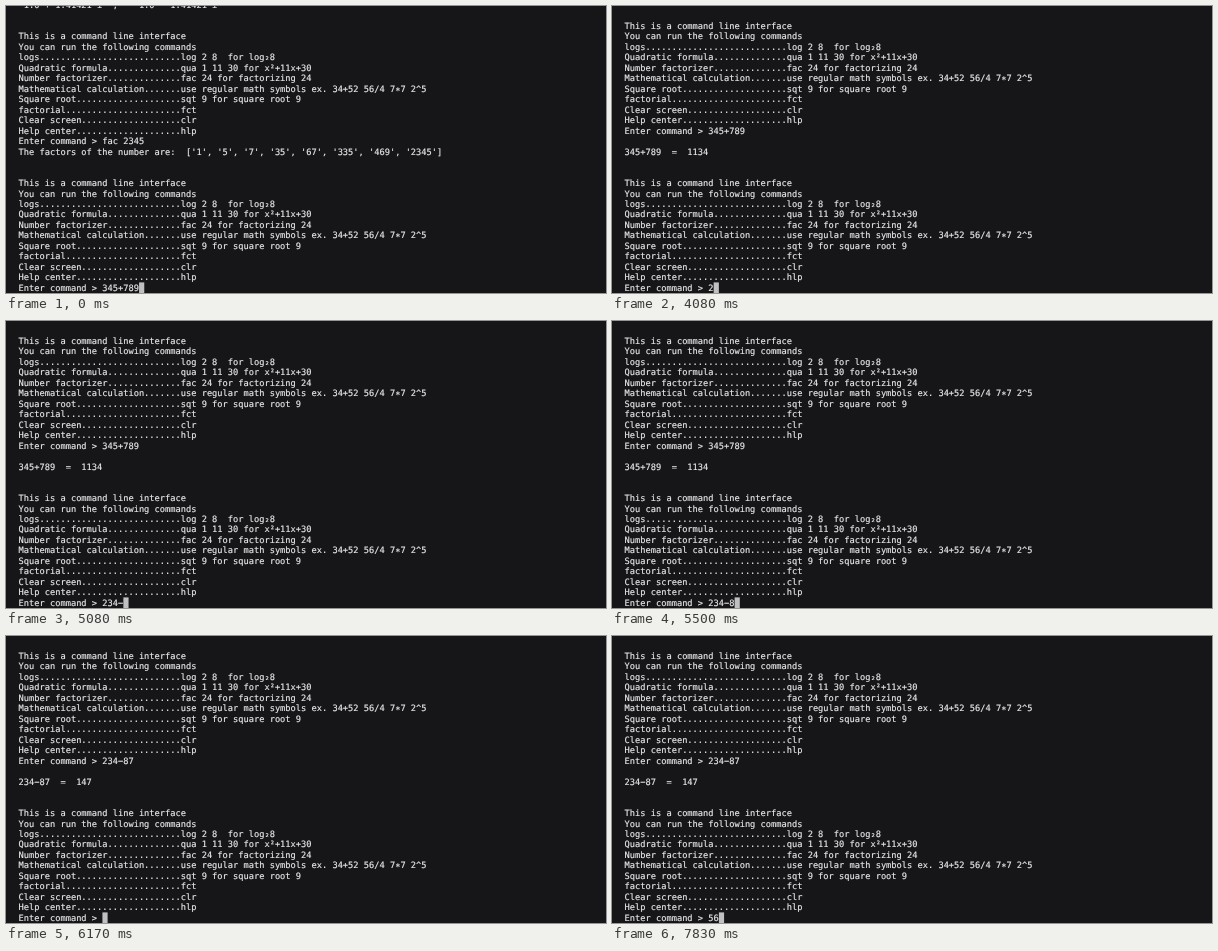
Recreate the animation shown at these times as an HTML page. Size 600 by 287 pixels, loop 8 s.

```html
<!DOCTYPE html>
<html lang="en">
<head>
<meta charset="utf-8">
<title>Command line calculator</title>
<style>
  html, body { margin: 0; width: 100%; height: 100%; overflow: hidden; background: #161517; }
  svg { display: block; width: 600px; height: 287px; }
  text {
    font: 8.7px "DejaVu Sans Mono", monospace;
    fill: #e9e9ea;
    stroke: #e9e9ea;
    stroke-width: 0.18px;
    white-space: pre;
    text-rendering: geometricPrecision;
  }
</style>
</head>
<body>
<svg viewBox="0 0 600 287">
  <rect width="600" height="287" fill="#161517"/>
  <rect id="cursor" y="276.4" width="5.2" height="10.6" fill="#c0c0c1"/>
  <g id="screen"></g>
</svg>
<script>
const LOOP = 8000, LEFT = 12.6, CHAR = 5.238, BASE = 23, LINE = 10.47;
const PROMPT = "Enter command > ";
const FIRST_ROW = -2, LAST_ROW = 25;

const entry = (name, usage) => name.padEnd(31, ".") + usage;
const MENU = [
  "This is a command line interface",
  "You can run the following commands",
  entry("logs", "log 2 8  for log₂8"),
  entry("Quadratic formula", "qua 1 11 30 for x²+11x+30"),
  entry("Number factorizer", "fac 24 for factorizing 24"),
  entry("Mathematical calculation", "use regular math symbols ex. 34+52 56/4 7∗7 2^5"),
  entry("Square root", "sqt 9 for square root 9"),
  entry("factorial", "fct"),
  entry("Clear screen", "clr"),
  entry("Help center", "hlp")
];

const session = (command, ...output) => [...MENU, PROMPT + command, ...output, "", ""];
const FACTORED = ["'1.0 + 1.41421 i' ,   '1.0 − 1.41421 i'", "", "",
  ...session("fac 2345", "The factors of the number are:  " +
    "['1', '5', '7', '35', '67', '335', '469', '2345']")];
const ADDED = ["", "", ...session("345+789", "", "345+789  =  1134")];
const SUBTRACTED = ["", "", ...session("234−87", "", "234−87  =  147")];

// start time, scrollback, typed text
const STEPS = [
  [0, FACTORED, "345+789"],
  [250, ADDED, ""],
  [4080, ADDED, "2"],
  [4330, ADDED, "23"],
  [4580, ADDED, "234"],
  [5080, ADDED, "234−"],
  [5500, ADDED, "234−8"],
  [5750, ADDED, "234−87"],
  [6170, SUBTRACTED, ""],
  [7670, SUBTRACTED, "5"],
  [7830, SUBTRACTED, "56"]
];

const screen = document.getElementById("screen");
const cursor = document.getElementById("cursor");
const rows = [];
for (let i = FIRST_ROW; i <= LAST_ROW; i++) {
  const row = document.createElementNS("http://www.w3.org/2000/svg", "text");
  row.setAttribute("x", LEFT);
  row.setAttribute("y", BASE + i * LINE);
  screen.append(row);
  rows.push(row);
}

let shown = null;
function draw(time) {
  const step = STEPS.findLast(([start]) => start <= time);
  if (step === shown) return;
  shown = step;
  const [, history, typed] = step;
  const lines = [...history, ...MENU, PROMPT + typed];
  // Keep the prompt on the bottom row.
  const offset = lines.length - rows.length;
  rows.forEach((row, i) => { row.textContent = lines[i + offset] ?? ""; });
  cursor.setAttribute("x", LEFT + CHAR * (PROMPT.length + typed.length));
}

const origin = performance.now();
function tick() {
  draw((performance.now() - origin) % LOOP);
  requestAnimationFrame(tick);
}
draw(0);
tick();
</script>
</body>
</html>
```
